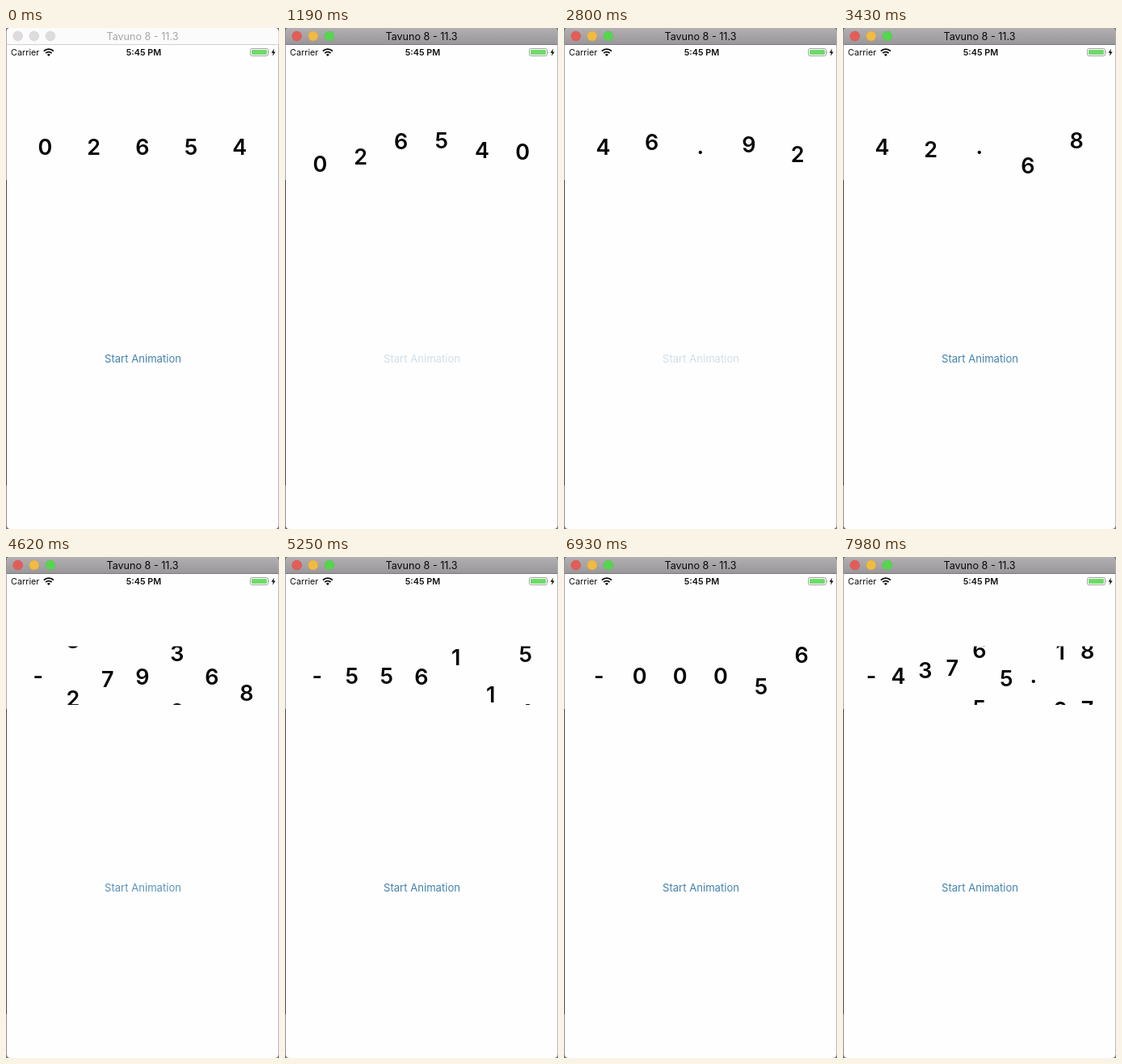
An HTML page that plays this animation: 338x620 px, repeating every 8 s.

```html
<!DOCTYPE html>
<html lang="en">
<head>
<meta charset="utf-8">
<title>Scrolling number</title>
<style>
html, body { margin: 0; width: 100%; height: 100%; overflow: hidden; background: #fff; }
svg { display: block; width: 100vw; height: 100vh; }
text { font-family: Inter, Roboto, sans-serif; text-anchor: middle; }
#reels text { font-size: 27px; font-weight: 600; fill: #060606; }
#bar { fill: url(#grey); }
#rule { fill: #7d7a7d; }
#title { font-size: 12.6px; fill: #0a090a; }
.status { font-size: 10.8px; fill: #111; }
#button { font-size: 13.1px; fill: #4482ae; }
.idle #bar { fill: #fbfbfb; }
.idle #rule { fill: #d2d0d2; }
.idle #title { fill: #a9a7a9; }
.idle .light { fill: #dddbdd; stroke: #d2d0d2; }
.light { stroke-width: .5; }
</style>
</head>
<body>
<svg id="stage" class="idle" viewBox="0 0 338 620">
  <defs>
    <linearGradient id="grey" x2="0" y2="1">
      <stop offset="0" stop-color="#b2afb2"/>
      <stop offset="1" stop-color="#9a979a"/>
    </linearGradient>
    <clipPath id="slot"><rect y="110.5" width="338" height="72.5"/></clipPath>
    <clipPath id="frame"><rect x=".8" width="336.7" height="620" rx="4.5"/></clipPath>
  </defs>

  <rect width="338" height="620" fill="#77747a"/>
  <rect y="20" width="2" height="168" fill="#9492aa"/>
  <rect y="188" width="2" height="378" fill="#1c1a1e"/>
  <g clip-path="url(#frame)">
    <rect width="338" height="620" fill="#fefefe"/>
    <rect id="bar" width="338" height="20.5"/>
    <rect id="rule" y="20" width="338" height="1"/>
  </g>
  <circle class="light" cx="14.7" cy="10" r="6" fill="#e35d58" stroke="#d0524d"/>
  <circle class="light" cx="34.8" cy="10" r="6" fill="#f1bb42" stroke="#dba93b"/>
  <circle class="light" cx="54.9" cy="10" r="6" fill="#57d550" stroke="#4cc246"/>
  <text id="title" x="169" y="14.6">Tavuno 8 - 11.3</text>

  <text class="status" x="23.7" y="34">Carrier</text>
  <g fill="none" stroke="#0a0a0a" stroke-width="1.9">
    <path d="M46.9 28.7a8.3 8.3 0 0 1 12 0"/>
    <path d="M49.2 31.2a5.2 5.2 0 0 1 7.4 0"/>
  </g>
  <path d="M50.9 32.9a2.8 2.8 0 0 1 4 0l-2 2.2z" fill="#0a0a0a"/>
  <text class="status" x="170.5" y="34" font-weight="600">5:45 PM</text>
  <rect x="302.5" y="25.5" width="22" height="9" rx="2" fill="#fff" stroke="#8b8b8b" stroke-width=".8"/>
  <rect x="304" y="27" width="19" height="6" rx="1" fill="#6ddb68"/>
  <path d="M325.6 28.5q1.6 1.5 0 3z" fill="#8b8b8b"/>
  <path d="M332 25.6l-3.4 5.2h2.2l-.8 4 3.6-5.4h-2.3z" fill="#0a0a0a"/>

  <g id="reels" clip-path="url(#slot)"></g>
  <text id="button" x="169.5" y="413.8">Start Animation</text>
</svg>

<script>
const LOOP = 8000, TICK = 70, ROW = 72, BASE = 156.8;
const LEFT = 18.3, WIDTH = 301;
const ACTIVE_AT = 980, PRESS = 120, FADE = 450;

// A column is a fixed character, or a reel: [from, to, duration, delay]
const spins = [
  { at: 0, cols: ['0', '2', '6', '5', '4'] },
  { at: 1120, cols: [[0, 4, 400], [2, 6, 540], [6, 2, 690], [15, 9, 842], [4, 8, 959], [0, 9, 1092]] },
  { at: 2730, cols: ['4', [6, 2, 748], '.', [9, 6, 888], [2, 8, 766]] },
  { at: 4290, cols: ['-', [0, 5, 679], [8, 5, 872], [10, 6, 1001], [3, 0, 1404], [7, 0, 1345], [9, 3, 1476]] },
  { at: 5850, cols: ['-', [5, 0, 625], [5, 0, 996], [6, 0, 616], [0, 6, 1354, 53], [0, 6, 1274, 7]] },
  { at: 7410, cols: ['-', [0, 4, 500], [0, 3, 645], [6, 7, 754], [0, 7, 814], [0, 6, 772], '.', [0, 2, 1575], [6, 9, 1103]] }
];

const byId = id => document.getElementById(id);
const stage = byId('stage'), reels = byId('reels'), button = byId('button');
const clamp = p => Math.min(1, Math.max(0, p));
const ease = p => (1 - Math.cos(Math.PI * clamp(p))) / 2;

const makeText = () => reels.appendChild(document.createElementNS('http://www.w3.org/2000/svg', 'text'));
const slots = Array.from({ length: 9 }, () => [makeText(), makeText()]);

function put(node, char, x, y) {
  node.textContent = char;
  node.setAttribute('x', x);
  node.setAttribute('y', y);
}

function drawColumn([low, high], col, x, age) {
  if (typeof col === 'string') {
    put(low, col, x, col === '.' ? BASE - 1 : BASE);
    put(high, '', x, 0);
    return;
  }
  const [from, to, length, delay = 0] = col;
  const value = from + (to - from) * ease((age - delay) / length);
  const digit = Math.floor(value);
  const y = BASE + ROW * (value - digit);
  put(low, digit % 10, x, y);
  put(high, (digit + 1) % 10, x, y - ROW);
}

function buttonAlpha(t) {
  const last = spins.filter(s => s.at && t >= s.at - PRESS).pop();
  return last ? 0.2 + 0.8 * ease((t - last.at) / FADE) : 1;
}

function draw(t) {
  const { at, cols } = spins.filter(s => t >= s.at).pop();
  slots.forEach((slot, i) => {
    const x = LEFT + WIDTH * (i + 0.5) / cols.length;
    drawColumn(slot, cols[i] || '', x, t - at);
  });
  stage.classList.toggle('idle', t < ACTIVE_AT);
  button.setAttribute('opacity', buttonAlpha(t));
}

const start = performance.now();
function loop() {
  const t = (performance.now() - start) % LOOP;
  draw(Math.floor(t / TICK) * TICK);
  requestAnimationFrame(loop);
}
loop();
</script>
</body>
</html>
```
